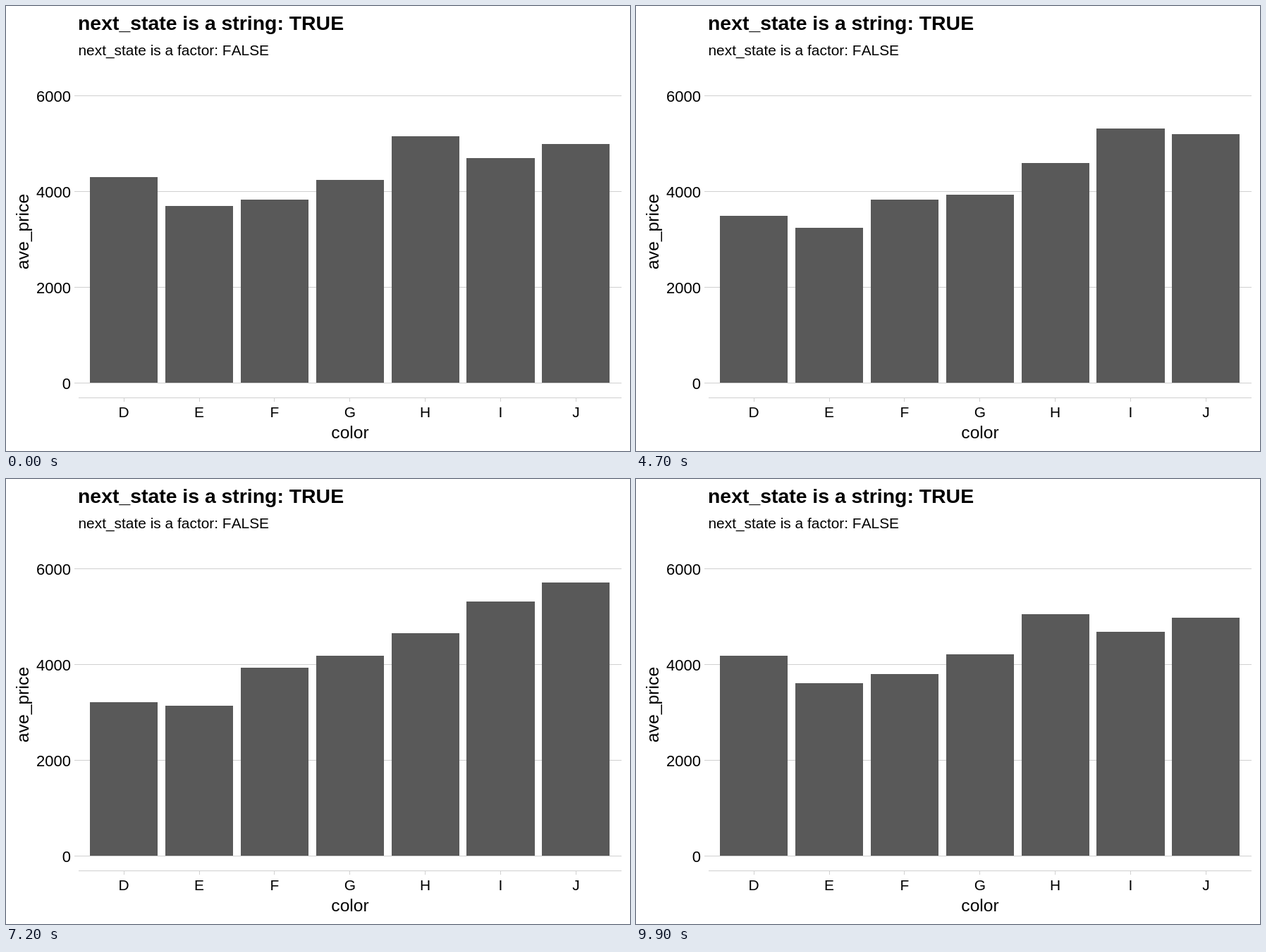
Recreate the animation shown at these times as an HTML page. Size 885 by 632 pixels, loop 10000 ms.

```html
<!DOCTYPE html>
<html lang="en">
<head>
<meta charset="utf-8">
<title>Average price by color</title>
<style>
  html, body { margin: 0; width: 100%; height: 100%; overflow: hidden; background: #fff; }
  svg { display: block; width: 100vw; height: 100vh; }
  text { font-family: "Liberation Sans", Arial, sans-serif; font-kerning: none; fill: #000; }
  line { stroke: #d0d0d0; stroke-width: 1; shape-rendering: crispEdges; }
  rect { fill: #595959; shape-rendering: crispEdges; }
</style>
</head>
<body>
<svg id="chart" viewBox="0 0 885 632"></svg>
<script>
const chart = document.getElementById("chart");
const LOOP = 10000, STEP = 100, SPAN = 2000;
const BASE = 535.2, SCALE = 0.0681;
const FIRST = 167.15, PITCH = 106.87, HALF = PITCH * 0.45;
const colors = [..."DEFGHIJ"];

// Average price per color, one row for each state
const states = [
  [4291, 3682, 3827, 4239, 5136, 4685, 4976],
  [3405, 3424, 3496, 4123, 4276, 5079, 4574],
  [3470, 3215, 3779, 3873, 4535, 5256, 5104],
  [3631, 3539, 4325, 4501, 5217, 5946, 6295],
  [2629, 2598, 3375, 3721, 3889, 4452, 4918]
];

function add(tag, attrs, content) {
  const el = document.createElementNS("http://www.w3.org/2000/svg", tag);
  for (const key in attrs) el.setAttribute(key, attrs[key]);
  if (content) el.textContent = content;
  return chart.appendChild(el);
}

function label(content, x, y, size, anchor = "middle", more = {}) {
  return add("text", { x, y, "font-size": size, "text-anchor": anchor, ...more }, content);
}

function rule(x1, y1, x2, y2) {
  add("line", { x1, y1, x2, y2 });
}

label("next_state is a string: TRUE", 102, 34, 28.4, "start", { "font-weight": "bold" });
label("next_state is a factor: FALSE", 102.5, 70, 20.9, "start");

[0, 2000, 4000, 6000].forEach((value, i) => {
  const y = 535.5 - i * 136;
  rule(97, y, 873, y);
  label(String(value), 92, y + 8, 22, "end");
});

rule(103, 556.5, 873, 556.5);

const bars = colors.map((name, i) => {
  const center = FIRST + i * PITCH;
  const left = Math.round(center - HALF);
  const tick = Math.floor(center) + 0.5;
  rule(tick, 556, tick, 562);
  label(name, center, 584, 20.9);
  return add("rect", { x: left, width: Math.round(center + HALF) - left });
});

label("color", 488, 614, 24.6);
label("ave_price", 0, 0, 24.8, "middle", { transform: "translate(31.5 320.5) rotate(-90)" });

function draw(ms) {
  const time = Math.floor((ms % LOOP) / STEP) * STEP;
  const index = Math.floor(time / SPAN);
  const from = states[index];
  const to = states[(index + 1) % states.length];
  const hold = index === 0 ? 500 : 600;
  const mix = Math.max(0, (time % SPAN - hold) / (SPAN - hold));
  bars.forEach((bar, i) => {
    const value = from[i] + (to[i] - from[i]) * mix;
    const top = Math.round(BASE - value * SCALE);
    bar.setAttribute("y", top);
    bar.setAttribute("height", 535 - top);
  });
}

const start = performance.now();
function tick(now) {
  draw(Math.max(0, now - start));
  requestAnimationFrame(tick);
}
draw(0);
requestAnimationFrame(tick);
</script>
</body>
</html>
```
